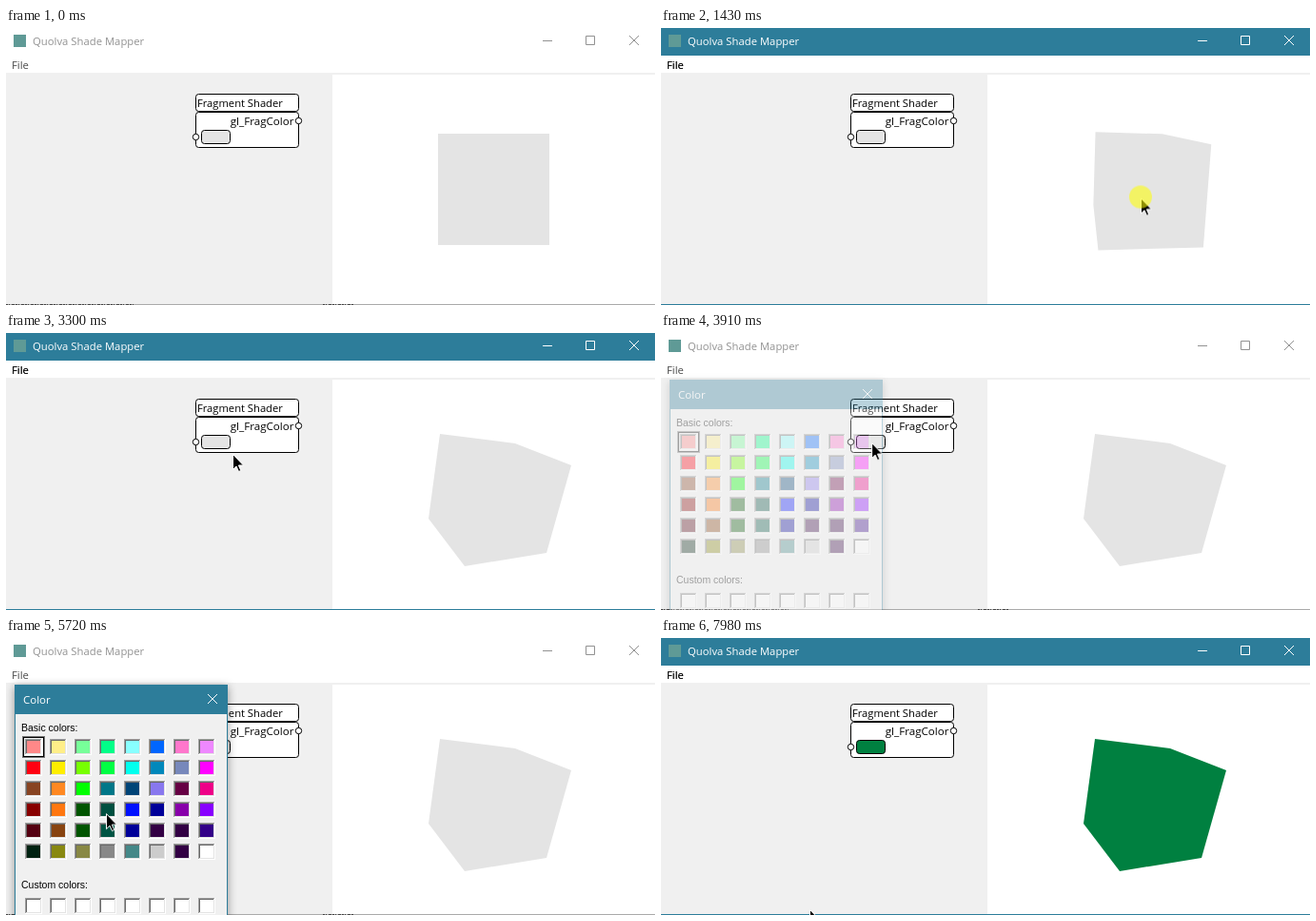
These frames come from a looping animation (682 px wide and 291 px high, 8 s). An HTML page:

```html
<!DOCTYPE html>
<html lang="en">
<head>
<meta charset="utf-8">
<title>Shader editor</title>
<style>
  html, body { margin: 0; width: 100%; height: 100%; overflow: hidden; background: #fff; }
  svg { display: block; width: 682px; height: 291px; }
  text { font: 11.3px "Open Sans", "Noto Sans", sans-serif; }
  .label { font: 10.5px "Liberation Sans", Arial, sans-serif; }
  .node { fill: #fff; stroke: #000; }
  .line { fill: none; }
  #frame { filter: drop-shadow(0 2px 5px #0006); }
</style>
</head>
<body>
<svg viewBox="0 0 682 291" xmlns="http://www.w3.org/2000/svg">
  <rect width="682" height="291" fill="#fff"/>
  <g id="idle"></g>
  <g id="active" opacity="0"></g>
  <rect y="47" width="682" height="2" fill="#f0f0f0"/>
  <rect y="49" width="343" height="241" fill="#f0f0f0"/>
  <path id="cube" fill="#e4e4e4"/>
  <g class="node">
    <rect x="199.5" y="69.5" width="108" height="18" rx="3"/>
    <rect x="199.5" y="88.5" width="108" height="37" rx="3"/>
    <circle cx="307.5" cy="97.5" r="3.2"/>
    <circle cx="199.5" cy="114.5" r="3.2"/>
    <rect id="chip" x="205.5" y="107.5" width="30" height="14" rx="3" fill="#e4e4e4"/>
  </g>
  <text x="201" y="83" style="font-size:11.2px">Fragment Shader</text>
  <text x="302.5" y="102" text-anchor="end" style="font-size:11.6px">gl_FragColor</text>
  <g id="dialog" opacity="0"></g>
  <g id="mouse" opacity="0">
    <path d="M.5 .5V16.5L4 13 6.5 18.5 8.8 17.5 6.4 12H11.5Z" stroke="#fff"/>
    <circle id="press" cy="-1" r="12" fill="#ff0" fill-opacity=".56" opacity="0"/>
  </g>
</svg>
<script>
const LOOP = 8000;
const TICK = 1000 / 13;
const GREEN = '#008040';
const $ = id => document.getElementById(id);

function chrome(bar, ink, menuInk, edge) {
  return `<rect width="682" height="29" fill="${bar}"/>
    <rect x="8" y="7" width="13" height="13" fill="#5f9a96"/>
    <text x="28" y="18" fill="${ink}">Quolva Shade Mapper</text>
    <path class="line" stroke="${ink}" d="M564 13.5h10M609.5 8.5h9v9h-9zM655 8l10 10M665 8l-10 10"/>
    <text x="6" y="43" fill="${menuInk}">File</text>
    <rect y="290" width="682" height="1" fill="${edge}"/>`;
}
$('idle').innerHTML = chrome('#fff', '#929292', '#4a4a4a', '#aaa') +
  '<path d="M0 290.5H134M333 290.5H365" stroke="#444" stroke-dasharray="2 1 1 2 3 1"/>';
$('active').innerHTML = chrome('#2d7d9a', '#fff', '#000', '#2d7d9a');

const palette = [
  'f88 fe8 7f9 0f8 8ff 06f f7c e8f',
  'f01 fe0 7f0 0f4 0fe 08b 78b f0f',
  '842 f82 0f0 078 047 87e 604 e08',
  '800 f71 050 054 01f 009 80a 80f',
  '501 841 050 054 009 304 304 308',
  '021 881 884 888 488 ccc 304 fff'
].map(row => row.split(' '));

// Sunken colour well: two bevel layers around the fill.
function well(col, y, color) {
  const x = 20 + 26 * col;
  const layer = (dx, dy, w, h, fill) =>
    `<rect x="${x + dx}" y="${y + dy}" width="${w}" height="${h}" fill="${fill}"/>`;
  return '<g>' + layer(0, 0, 18, 17, '#fff') + layer(0, 0, 17, 16, '#a0a0a0') +
    layer(1, 1, 16, 15, '#e3e3e3') + layer(1, 1, 15, 14, '#696969') +
    layer(2, 2, 14, 13, color) + '</g>';
}
const wells = (row, y) => row.map((c, col) => well(col, y, '#' + c)).join('');

$('dialog').innerHTML = `
  <rect id="frame" x="9" y="49" width="224" height="260" fill="#2d7d9a"/>
  <rect x="10" y="80" width="222" height="220" fill="#f0f0f0"/>
  <text x="18" y="69" fill="#fff" style="font-size:11.5px">Color</text>
  <path d="M212 59l10 10M222 59l-10 10" stroke="#fff"/>
  <text class="label" x="16" y="98">Basic colors:</text>
  <text class="label" x="16" y="263">Custom colors:</text>
  <g id="basic">${palette.map((row, r) => wells(row, 106 + 22 * r)).join('')}</g>
  ${wells(Array(8).fill('fff'), 273)}
  <g id="focus" class="line" stroke="#000">
    <rect x="17.5" y="103.5" width="23" height="22" stroke-dasharray="1 1"/>
    <rect x="18.5" y="104.5" width="21" height="20"/>
  </g>`;

function play(el, prop, rows, easing) {
  const all = [...rows, [LOOP, rows[rows.length - 1][1]]];
  const frames = all.map(([t, v], i) => ({
    offset: t / LOOP, [prop]: v, easing: easing(i + 1 < all.length ? all[i + 1][0] - t : 0)
  }));
  el.animate(frames, {duration: LOOP, iterations: Infinity});
}
// glide: straight travel between rows, one jump per tick; hold: hard changes.
const glide = (el, prop, ...rows) =>
  play(el, prop, rows, dt => `steps(${Math.max(1, Math.round(dt / TICK))})`);
const hold = (el, prop, ...rows) => play(el, prop, rows, () => 'steps(1)');
const showIn = (el, ...spans) =>
  hold(el, 'opacity', [0, 0], ...spans.flatMap(([from, to]) => [[from, 1], [to, 0]]));

const at = (x, y) => `translate(${x}px, ${y}px)`;
const shape = points => `path("M${points} Z")`;

glide($('mouse'), 'transform',
  [0, at(596, 281)],
  [130, at(596, 281)], [880, at(498, 170)],
  [1110, at(497, 169)], [1970, at(516, 195)], [2840, at(529, 190)],
  [2990, at(529, 190)], [3300, at(238, 127)], [3600, at(223, 114)],
  [4230, at(218, 117)], [4460, at(203, 125)], [5160, at(111, 182)], [5320, at(105, 185)],
  [6250, at(105, 183)], [6650, at(82, 252)], [7980, at(156, 285)]);
showIn($('mouse'), [130, 6730], [7980, LOOP]);
showIn($('press'), [1110, 2990], [3600, 3850], [5870, 6100]);
showIn($('active'), [1110, 3770], [7590, LOOP]);
glide($('dialog'), 'opacity', [0, 0], [3770, 0], [4000, 1], [7510, 1], [7590, 0]);

const flat = shape('454 111 L515 111 L571 111 L571 228 L454 228 L454 185');
const turning = shape('461 106 L547 112 L591 142 L568 235 L469 243 L455 188');
const turned = shape('456 106 L535 116 L594 139 L568 231 L482 245 L444 195');
glide($('cube'), 'd', [0, flat], [1110, flat], [1970, turning], [2050, turned]);

for (const id of ['cube', 'chip']) hold($(id), 'fill', [0, '#e4e4e4'], [7590, GREEN]);

// The pick moves from the first well to column 3, row 3.
const chosen = $('basic').children[3 * 8 + 3].lastElementChild;
hold(chosen, 'fill', [0, '#005040'], [5870, GREEN]);
hold($('focus'), 'transform', [0, at(0, 0)], [5870, at(3 * 26, 3 * 22)]);
</script>
</body>
</html>
```
